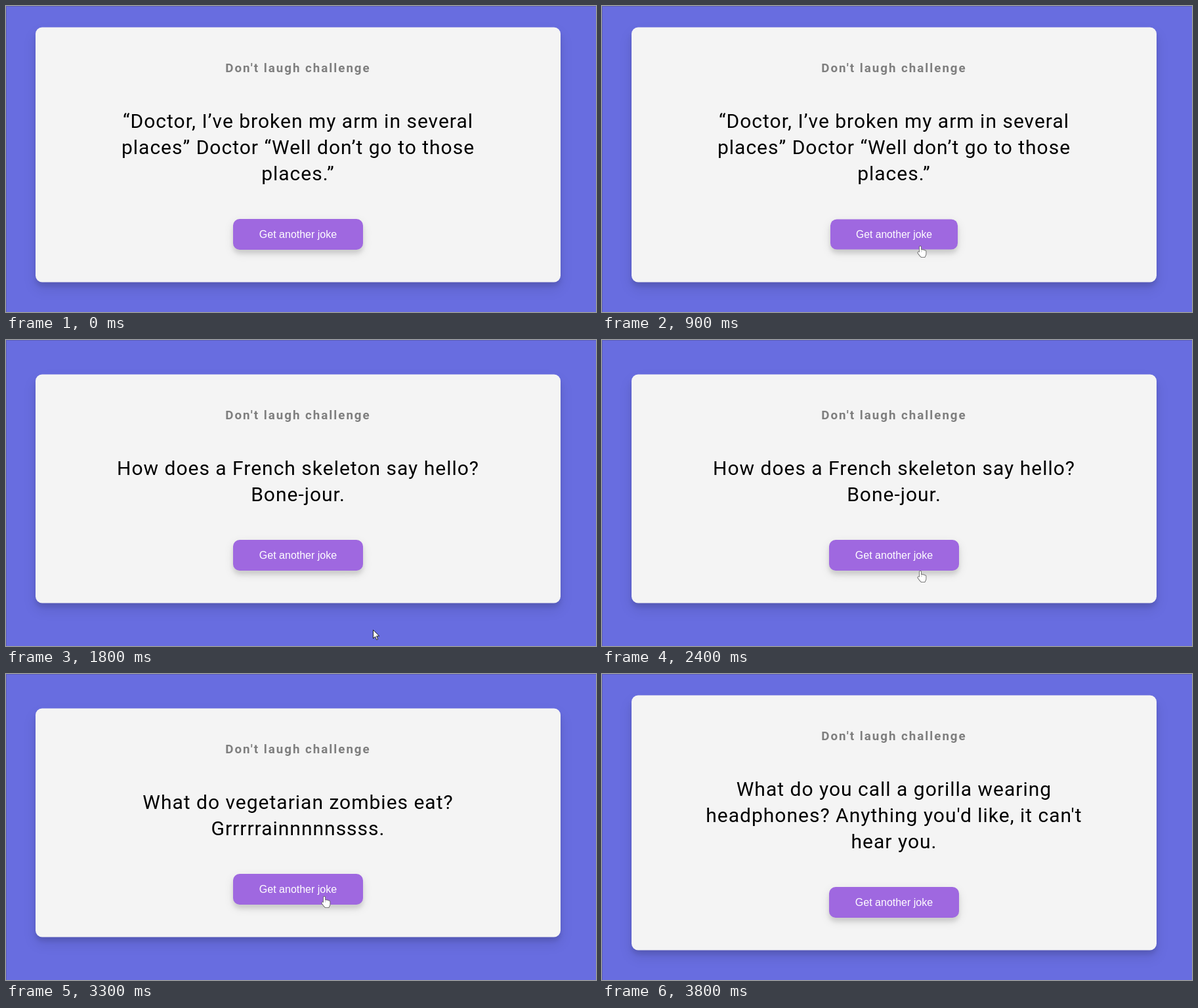
Animation, 899 px wide and 467 px high, one loop 4300 ms. Source, as an HTML page:

```html
<!DOCTYPE html>
<html lang="en">
<head>
<meta charset="utf-8">
<title>Joke card</title>
<style>
  * { box-sizing: border-box; }
  html, body { margin: 0; width: 100%; height: 100%; overflow: hidden; }
  body { position: relative; background: #686de0; font-family: Roboto, sans-serif; }
  .edge { position: absolute; inset: 0; border: solid rgba(60, 60, 90, .3); border-width: 1px 0 0 1px; }
  .card { position: absolute; left: 45px; width: 800px; padding: 50px 20px; text-align: center; }
  .card::before {
    content: ""; position: absolute; inset: 0; transform: translateY(-.5px);
    border-radius: 10px; background: #f4f4f4;
    box-shadow: 0 10px 20px rgba(0, 0, 0, .1), 0 6px 6px rgba(0, 0, 0, .1);
  }
  h3, .joke { position: relative; top: 1px; }
  h3 { margin: 0; font-size: 18.72px; line-height: 22px; letter-spacing: 2px; color: #7e7e7e; }
  .joke {
    margin: 50px 0; font-size: 30px; line-height: 40px; letter-spacing: 1px;
    color: #000; white-space: pre;
  }
  .button {
    position: relative; width: 198px; height: 47px; margin: 0 auto; padding: 14px 0;
    border-radius: 10px; background: #9f68e0; color: #fff;
    font: 16px/19px "Liberation Sans", Arial, sans-serif;
    box-shadow: 0 5px 15px rgba(0, 0, 0, .1), 0 6px 6px rgba(0, 0, 0, .1);
  }
  svg { position: absolute; left: 0; top: 0; width: 20px; height: 22px; overflow: visible; }
  #arrow { fill: #fff; stroke: #222; stroke-linejoin: round; }
  #hand { stroke-linecap: round; stroke-linejoin: round; }
  .outline { fill: #555; stroke: #555; stroke-width: 4; }
  .skin { fill: #fff; stroke: #fff; stroke-width: 2.4; }
</style>
</head>
<body>
<div class="edge"></div>
<div class="card">
  <h3>Don't laugh challenge</h3>
  <div class="joke"></div>
  <div class="button">Get another joke</div>
</div>
<svg id="arrow"><path d="M.5 .5V13.5L3.5 10.7L5.6 15.5L7.7 14.6L5.6 9.9H9.8Z"/></svg>
<svg id="hand">
  <defs><path id="fingers" d="M0 2V14M2.7 7V14M5.2 7.5V14M7.3 8.5V13L6 16H2L-2.5 10.5"/></defs>
  <use href="#fingers" class="outline"/>
  <use href="#fingers" class="skin"/>
</svg>
<script>
const LOOP = 4300, TICK = 100, LATENCY = 300, GLIDE = 300;
const jokes = [
  "“Doctor, I’ve broken my arm in several\nplaces” Doctor “Well don’t go to those\nplaces.”",
  "How does a French skeleton say hello?\nBone-jour.",
  "What do vegetarian zombies eat?\nGrrrrrainnnnnssss.",
  "What do you call a gorilla wearing\nheadphones? Anything you'd like, it can't\nhear you."
];
// The pointer's visits to the button; y is where it stops
const visits = [
  { arrive: 700, press: 900, leave: 1240, y: 366 },
  { arrive: 2400, press: 2500, leave: 2600, y: 352 },
  { arrive: 3300, press: 3400, leave: 3500, y: 339 }
];
const rest = { x: 559, y: 442 }, buttonX = 485;
const find = selector => document.querySelector(selector);
const card = find(".card"), joke = find(".joke"), button = find(".button");
const arrow = find("#arrow"), hand = find("#hand");

function drawCard(time) {
  const text = jokes[visits.filter(visit => visit.press + LATENCY <= time).length];
  if (joke.textContent !== text) joke.textContent = text;
  card.style.top = 93 - text.split("\n").length * 20 + "px";
  const pressed = visits.some(visit => visit.press === time);
  button.style.transform = pressed ? "scale(.98)" : "none";
}

function drawPointer(time) {
  const visit = visits.find(({ leave }) => time < leave + GLIDE) || visits[visits.length - 1];
  const away = Math.max(visit.arrive - time, time - visit.leave, 0) / GLIDE;
  const eased = Math.sin(Math.min(away, 1) * Math.PI / 2);
  const x = Math.round(buttonX + (rest.x - buttonX) * eased);
  const y = Math.round(visit.y + (rest.y - visit.y) * eased);
  const visible = time >= 500 && time < 3800;
  arrow.style.display = visible && away > 0 ? "block" : "none";
  hand.style.display = visible && away === 0 ? "block" : "none";
  arrow.style.transform = hand.style.transform = `translate(${x}px, ${y}px)`;
}

function loop() {
  const time = Math.floor(performance.now() % LOOP / TICK) * TICK;
  drawCard(time);
  drawPointer(time);
  requestAnimationFrame(loop);
}
loop();
</script>
</body>
</html>
```
